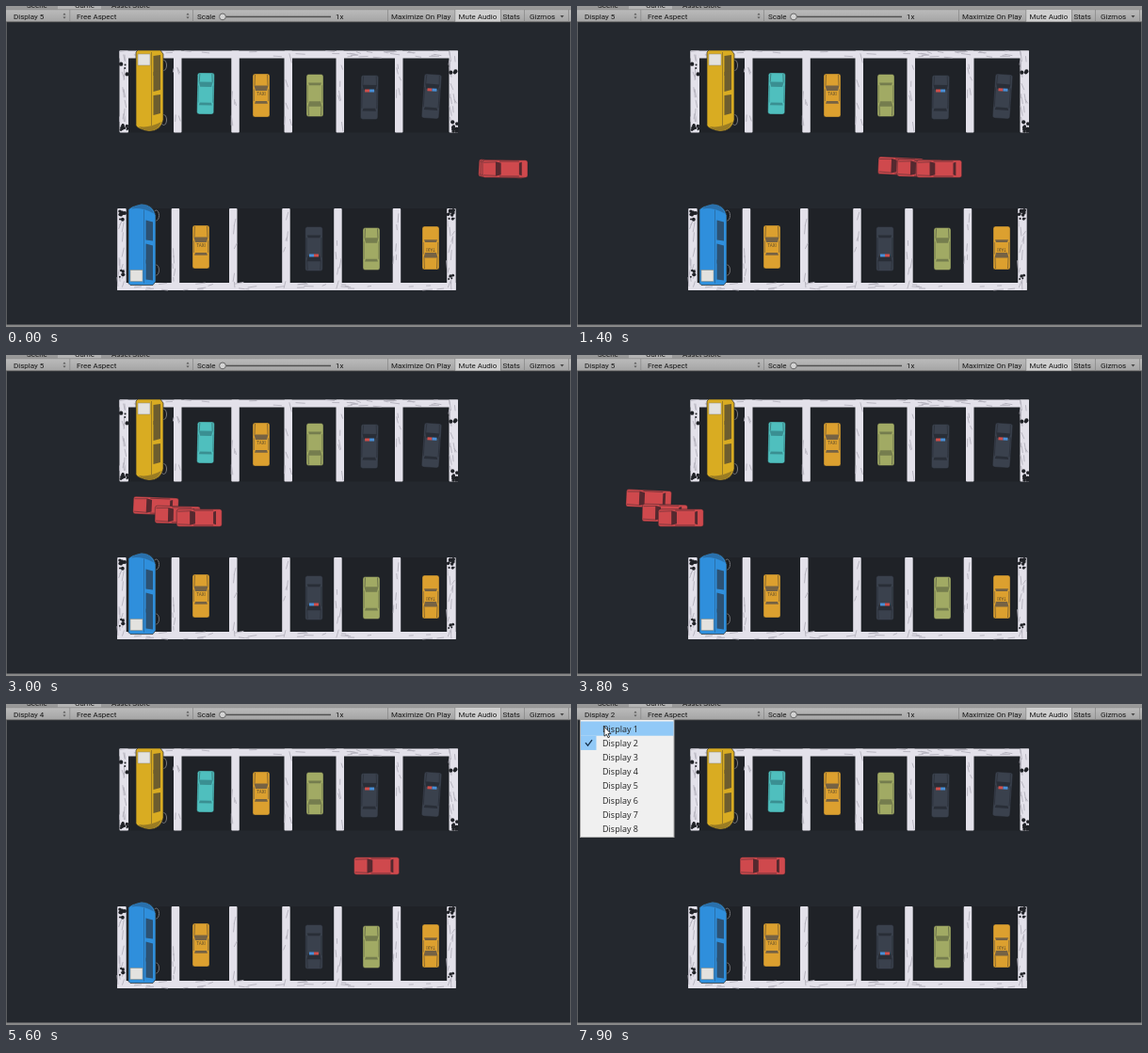
Animation, 600 px wide and 341 px high, one loop 8000 ms. Source, as an HTML page:

```html
<!DOCTYPE html>
<html lang="en">
<head>
<meta charset="utf-8">
<title>Parking simulation</title>
<style>
html, body { margin: 0; width: 100%; height: 100%; overflow: hidden; background: #24282e; }
svg { display: block; width: 600px; height: 341px; }
text { font: 8px Roboto, "Liberation Sans", sans-serif; fill: #161616; }
#menu text { font: 9px "Open Sans", "Noto Sans", sans-serif; fill: #222; }
</style>
</head>
<body>
<svg id="stage" viewBox="0 0 600 341"></svg>
<script>
const stage = document.getElementById('stage');
let seed = 7;
const rnd = () => (seed = seed * 16807 % 2147483647) / 2147483647;
const range = n => [...Array(n).keys()];
const rect = (x, y, w, h, fill, more = '') =>
  `<rect x="${x}" y="${y}" width="${w}" height="${h}" fill="${fill}" ${more}/>`;
const path = (d, fill, more = '') => `<path d="${d}" fill="${fill}" ${more}/>`;
const label = (x, y, s, more = '') => `<text x="${x}" y="${y}" ${more}>${s}</text>`;
const put = (x, y, turn, art) => `<g transform="translate(${x} ${y}) rotate(${turn})">${art}</g>`;

// A car seen from above, nose up, centred on the origin.
// The cabin runs from the windscreen at `front` to the rear window at `back`, as parts of h.
function car(color, w, h, glass, front, back, extra = '') {
  const a = w / 2, b = h / 2, f = h * front, r = h * back;
  const edge = 'stroke="#1d2026" stroke-opacity=".5" stroke-width=".8"';
  return rect(-a, -b, w, h, color, `rx="2.5" ${edge}`) +
    path(`M${2.5 - a} ${1 - b}L${2 - a} ${f}M${a - 2.5} ${1 - b}L${a - 2} ${f}`, 'none', edge) +
    path(`M${1.5 - a} ${f}H${a - 1.5}L${a - 3} ${f + h * .12}H${3 - a}Z
      M${3 - a} ${r}H${a - 3}L${a - 2} ${r + h * .06}H${2 - a}Z`, glass) +
    path(`M${1.3 - a} ${f + 4}V${r}M${a - 1.3} ${f + 4}V${r}`, 'none', `stroke="${glass}" opacity=".7"`) + extra;
}

const sign = label(0, 0, 'TAXI', 'text-anchor="middle" style="font-size:4.5px;fill:#5b4a2c"');
const lights = rect(-5, -8.5, 5, 3, '#cf4f4c') + rect(0, -8.5, 5, 3, '#4a8fd6');
const teal = car('#4fbfbe', 18, 44, '#3a8f92', -.28, .22);
const taxi = car('#dca02f', 18, 46, '#756244', -.23, .13, sign);
const olive = car('#a1aa64', 18, 45, '#757d4e', -.26, .24);
const police = car('#3a414d', 18.5, 47, '#292e37', -.28, .25, lights);
const red = car('#cf494d', 18.5, 48, '#55292f', -.21, .31);

// A bus seen from above with its right side showing, nose down.
function bus(color, dark, glass) {
  const wheel = y => `<ellipse cx="29.5" cy="${y}" rx="3" ry="5.5" fill="#1b1c1f" stroke="#77787c"/>`;
  return wheel(16) + wheel(74) +
    path('M2 0H26L29 4V74Q26 86 14 86Q2 84 0 80V2Z', color, 'stroke="#30302a" stroke-width=".7"') +
    path('M3 81Q14 83 27 76Q24 85 14 86Q5 84 3 81Z', dark) +
    path('M16.5 2V80', 'none', `stroke="${dark}"`) +
    rect(2, 4, 13, 12, '#e3e2df', 'stroke="#8a8778" stroke-width=".5"') +
    [5, 22, 47].map(y => path(`M18.5 ${y + 1}L26 ${y}V${y + 20}L18.5 ${y + 22}Z`, glass)).join('');
}

// One row of marble bay lines, opening downwards, with a worn end on both outer posts.
function bays() {
  const posts = [120.5, 178, 239.3, 295.5, 350.5, 413, 470.5];
  let veins = '', worn = '';
  let s = rect(120.5, 0, 359.5, 87, '#1f2227');
  posts.forEach((x, i) => {
    const outer = i % 6 === 0;
    s += rect(x, 0, outer ? 9.5 : 8.5, 87, '#e3e1ea', 'rx="1"');
    for (const n of range(outer ? 14 : 5))
      veins += `M${x + rnd() * 6} ${rnd() * 76}l${rnd() * 4 - 1} ${4 + rnd() * 7}`;
    if (outer) for (const n of range(14)) {
      const y = n < 10 ? 75 + rnd() * 11 : 12 + rnd() * 14;
      worn += `<circle cx="${x + 1 + rnd() * 8}" cy="${y}" r="${.8 + rnd() * 1.4}"/>`;
    }
  });
  s += rect(120.5, 0, 359.5, 8, '#e3e1ea');
  for (const n of range(30))
    veins += `M${120 + rnd() * 350} ${rnd() * 7}l${4 + rnd() * 7} ${rnd() * 3 - 1}`;
  return s + path(veins, 'none', 'stroke="#b4b2bd" stroke-width=".9"') + `<g fill="#202227">${worn}</g>`;
}

const flipped = (x, y, art) => `<g transform="translate(${x} ${y}) scale(1 -1)">${art}</g>`;
const lot = put(0, 47.5, 0, bays()) + flipped(-2.3, 302, bays()) +
  put(138, 47, 0, bus('#d9ac22', '#9a7c24', '#6d5d2e')) +
  flipped(130, 296.5, bus('#2f8fdc', '#2a70ab', '#2c5274')) +
  put(212, 93, 1, teal) + put(271, 95, 0, taxi) + put(328, 95, 180, olive) +
  put(386, 97, 1, police) + put(452, 96, 4, police) +
  put(207, 256, 0, taxi) + put(327, 258, 180, police) +
  put(388, 258, 0, olive) + put(451, 257, 180, taxi);

const arrows = x => path(`M${x - 1.5} 9.5l1.5-2 1.5 2zM${x - 1.5} 11.5l1.5 2 1.5-2z`, '#555');
const bar = rect(0, 0, 600, 4, '#999') + rect(55, 0, 46, 4, '#b4b4b4') +
  label(22, 2.2, 'Scene') + label(73, 2.2, 'Game') + label(112, 2.2, 'Asset Store') +
  '<linearGradient id="shade" x2="0" y2="1"><stop stop-color="#bcbcbc"/><stop offset="1" stop-color="#a4a4a4"/></linearGradient>' +
  rect(0, 3.5, 600, 13.5, 'url(#shade)') + rect(0, 3.5, 600, .7, '#808080') + rect(0, 16.5, 600, .8, '#555') +
  rect(477, 4, 48, 12.5, '#d0d0d0') +
  [67.5, 198, 405, 476.5, 525, 550, 597].map(x => rect(x, 4, .7, 12.5, '#858585')).join('') +
  label(8, 13.6, 'Display 5', 'id="shown"') + arrows(62) + label(75, 13.6, 'Free Aspect') + arrows(193) +
  label(203, 13.6, 'Scale') + rect(230, 10.7, 115, 1.5, '#505050') +
  '<circle cx="230" cy="11.4" r="3.4" fill="#d4d4d4" stroke="#666"/>' + label(350, 13.6, '1x') +
  label(409, 13.6, 'Maximize On Play') + label(480.5, 13.6, 'Mute Audio') + label(527.5, 13.6, 'Stats') +
  label(556, 13.6, 'Gizmos') + path('M588.5 10h4l-2 2.5z', '#444');

const ROW = 15.2;
const menu = rect(3.5, 16.5, 99.5, 125, '#f0f0f0', 'stroke="#a6a6a6"') +
  rect(4, 0, 98.5, ROW, '#91c9f7', 'id="hover"') +
  `<g id="tick">${rect(4, 0, 16.5, ROW, '#91c9f7')}${path('M9 7.5l2.5 3 4.5-6', 'none', 'stroke="#17324d" stroke-width="1.3"')}</g>` +
  range(8).map(i => label(27, 29.5 + i * ROW, 'Display ' + (i + 1))).join('') +
  `<g id="cursor">${path('M0 0V10L2.4 8 4 11.6 5.6 10.8 4 7.4H7Z', '#fff', 'stroke="#111" stroke-width=".8"')}</g>`;

stage.innerHTML = rect(0, 0, 600, 341, '#24282e') + lot + '<g id="agents"></g>' +
  rect(0, 17, .7, 324, '#777') + rect(599.3, 17, .7, 324, '#777') + rect(0, 338.5, 600, 2.5, '#888') +
  bar + `<g id="menu">${menu}</g>`;
const $ = id => document.getElementById(id);

// Menu visits in seconds: while one is open the cars stand still.
const visits = [
  { from: 4.6, to: 5.2, shown: 5, pick: 4 },
  { from: 6.6, to: 7.1, shown: 4, pick: 3 },
  { from: 7.3, to: 7.4, shown: 3, pick: 2 },
  { from: 7.7, to: 8, shown: 2, pick: 1 }
];
const driven = t => t - visits.reduce((sum, v) => sum + Math.max(0, Math.min(t, v.to) - v.from), 0);

// First run: k goes from the leader to the slowest car.
const firstRun = t => range(3).map(i => {
  const k = i / 2, lead = (1 - k) ** 2;
  return put(526 + 4 * k - (137 - 37 * k) * t + (4.9 - 7.65 * k) * t * t,
    173 - 1.4 * lead * t * t, 2.5 * (1 - k) - 90, red);
});

// Second run: five cars fan out from the start, the fastest one swerving.
const secondRun = t => range(5).map(i => {
  const k = i / 4, swerve = k ** 4;
  return put(531 - (40 + 114 * k) * t, 172 + 16 * swerve * t, -10 * swerve * t - 90, red);
});

const loneCar = t => [put(446 - 131 * t, 172, -90, red)];

function agents(t) {
  if (t < 4) return firstRun(t);
  if (t < 5.2) return secondRun(driven(t) - 4);
  return loneCar(driven(t) - driven(5.2));
}

function draw(now) {
  const t = Math.floor(now % 8000 / 100) / 10;
  $('agents').innerHTML = agents(t).join('');
  $('shown').textContent = 'Display ' + (visits.find(v => t < v.to).shown);

  const open = visits.find(v => t >= v.from && t < v.to);
  $('menu').style.display = open ? '' : 'none';
  if (open) {
    // The pointer drops from the toolbar to the chosen row.
    const k = Math.min(1, (t - open.from) / .2);
    const x = 31 - 3 * open.pick * k + k, y = 12 + (open.pick * ROW - 3) * k;
    const row = Math.floor((y - 16.5) / ROW);
    $('hover').style.display = row < 0 ? 'none' : '';
    $('hover').setAttribute('y', 18.5 + row * ROW);
    $('tick').setAttribute('transform', `translate(0 ${18.5 + (open.shown - 1) * ROW})`);
    $('cursor').setAttribute('transform', `translate(${x} ${y})`);
  }
}

const start = performance.now();
function tick() {
  draw(performance.now() - start);
  requestAnimationFrame(tick);
}
tick();
</script>
</body>
</html>
```
